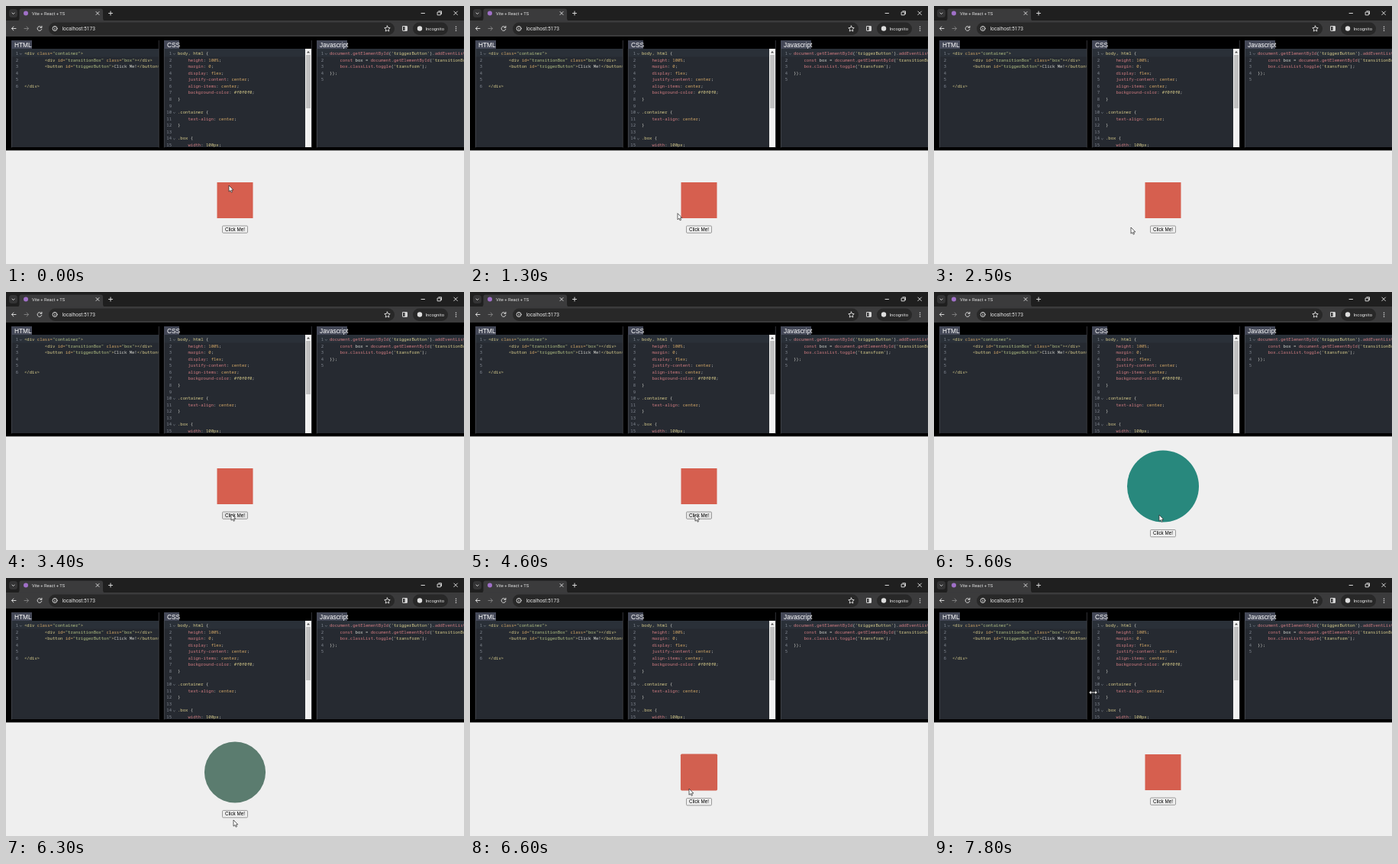
Write an HTML page that moves like this. It is 600x338 px and loops after 8 s.

```html
<!DOCTYPE html>
<html lang="en">
<head>
<meta charset="utf-8">
<title>Box transition playground</title>
<style>
  html, body { margin: 0; width: 100%; height: 100%; overflow: hidden; background: #efefef; }
  svg { display: block; width: 600px; height: 338px; }
  text { white-space: pre; }
  .code { font: 500 5.6px "Noto Sans Mono", "DejaVu Sans Mono", monospace; }
  .ui { font-family: Roboto, "Open Sans", sans-serif; fill: #e3e3e3; }
  .head { font: 8.3px "Liberation Sans", Arial, sans-serif; fill: #fff; }
  .line { fill: none; stroke: #d6d6d6; stroke-width: 1; stroke-linecap: round; stroke-linejoin: round; }
  .y { fill: #d9cd8c; } .o { fill: #d3a767; } .g { fill: #b3c184; }
  .r { fill: #d07c80; } .w { fill: #d2d2cc; } .n { fill: #858b95; }
</style>
</head>
<body>
<svg viewBox="0 0 600 338" xmlns="http://www.w3.org/2000/svg">
  <defs>
    <clipPath id="clip0"><rect x="7" y="56" width="193" height="129"/></clipPath>
    <clipPath id="clip1"><rect x="207" y="56" width="185" height="129"/></clipPath>
    <clipPath id="clip2"><rect x="407" y="56" width="193" height="129"/></clipPath>
  </defs>

  <!-- browser window -->
  <rect width="600" height="20" fill="#1f1f1f"/>
  <rect y="19" width="600" height="21" fill="#3b3b3c"/>
  <path d="M14 19.5Q17.500 19.500 17.500 16V6.500Q17.500 3.500 20.500 3.500H124Q127 3.500 127 6.500V16Q127 19.500 130.500 19.500Z" fill="#3b3b3c"/>
  <rect x="4" y="4" width="11" height="11" rx="3.500" fill="#343435"/>
  <circle cx="26" cy="9.500" r="3" fill="#a070c8"/>
  <text class="ui" x="34" y="11.800" font-size="5.700">Vite + React + TS</text>
  <rect x="56" y="21.500" width="453" height="16.500" rx="8.200" fill="#282828"/>
  <rect x="533" y="21.500" width="46" height="16.500" rx="8.200" fill="#282828"/>
  <circle cx="542" cy="29.500" r="3.200" fill="#dedede"/>
  <text class="ui" x="549.500" y="31.900" font-size="5.900">Incognito</text>
  <text class="ui" x="73.500" y="32.200" font-size="6.600">localhost:5173</text>
  <g class="line" stroke-width=".9">
    <path d="M8 9l1.600 1.600 1.600-1.600M118 7.500l4 4m0-4l-4 4M134.500 9.500h5m-2.500-2.500v5"/>
    <path d="M544 9.500h4.500M565.500 8h3.800v3.800h-3.800zM566.800 6.800h3.700v3.700M586.800 7l4.600 4.600m0-4.600l-4.600 4.600"/>
    <path d="M13 29.500H7.500m2.400-2.500l-2.500 2.500 2.500 2.500"/>
    <path d="M24 29.500h5.500m-2.400-2.500l2.500 2.500-2.500 2.500" stroke="#7d7d7d"/>
    <path d="M46.500 28a2.900 2.900 0 1 0 .3 2.400M46.900 26.300v2.100h-2.100"/>
    <circle cx="64" cy="29.500" r="3"/><path d="M64 29.300v1.500M64 27.800v.1"/>
    <path d="M499.500 26l1.100 2.400 2.600.3-1.900 1.800.5 2.600-2.300-1.300-2.300 1.300.5-2.600-1.900-1.800 2.600-.3z"/>
    <rect x="519.500" y="26.500" width="6" height="6" rx=".6"/>
  </g>
  <rect x="522.500" y="26.500" width="3" height="6" fill="#d6d6d6"/>
  <g fill="#d6d6d6"><circle cx="589.500" cy="27.200" r=".8"/><circle cx="589.500" cy="29.700" r=".8"/><circle cx="589.500" cy="32.200" r=".8"/></g>

  <!-- editors -->
  <rect y="40" width="600" height="149.500" fill="#000"/>
  <g id="panels"></g>
  <rect x="392" y="56" width="8" height="129" fill="#f1f1f1"/>
  <rect x="393" y="64" width="6" height="70" fill="#c1c1c1"/>
  <path d="M394 61.500l2-2.400 2 2.400z" fill="#505050"/>

  <!-- result -->
  <rect y="189.500" width="600" height="149" fill="#efefef"/>
  <rect id="box"/>
  <g id="button">
    <rect id="face" x="283.500" y="288" width="33" height="9.300" rx="1.200" stroke="#767676" stroke-width=".7"/>
    <text x="300" y="294.900" text-anchor="middle" font-family="'Liberation Sans', Arial, sans-serif" font-size="6.270">Click Me!</text>
  </g>
  <path id="arrow" d="M0 0V8.200L1.900 6.500 3.100 9.200 4.500 8.600 3.300 6H5.800Z" fill="#fff" stroke="#222" stroke-width=".7" stroke-linejoin="round"/>
  <path id="resize" d="M-5.500 0L-2.600-2.700V-.8H2.600V-2.700L5.500 0 2.600 2.700V.8H-2.600V2.700Z" fill="#fff" stroke="#000" stroke-width=".5"/>
</svg>
<script>
const $ = id => document.getElementById(id);
const esc = s => s.replace(/&/g, "&amp;").replace(/</g, "&lt;");

// Each line is a list of "<colour key>:<text>" parts joined by "|".
const decl = (name, value, key = "o") => `r:    ${name}|w:: |${key}:${value}|w:;`;
const panels = [
  { title: "HTML", x: 7, w: 27, num: 16, text: 24, folds: [0], lines: [
    'y:<div |o:class=|g:"container"|y:>',
    'y:        <div |o:id=|g:"transitionBox"|o: class=|g:"box"|y:></div>',
    'y:        <button |o:id=|g:"triggerButton"|y:>|w:Click Me!|y:</button>',
    '', '', 'y:</div>'] },
  { title: "CSS", x: 207, w: 20, num: 217, text: 225, folds: [0, 9, 13], lines: [
    'y:body, html |w:{', decl("height", "100%"), decl("margin", "0"), decl("display", "flex"),
    decl("justify-content", "center"), decl("align-items", "center"),
    decl("background-color", "#f0f0f0", "y"), 'w:}', '',
    'y:.container |w:{', decl("text-align", "center"), 'w:}', '',
    'y:.box |w:{', decl("width", "100px", "y")] },
  { title: "Javascript", x: 407, w: 40, num: 416, text: 424, folds: [0], lines: [
    "r:document|w:.|r:getElementById|w:(|y:'triggerButton'|w:).|r:addEventListener|w:(",
    "r:    const |w:box = |r:document|w:.|r:getElementById|w:(|y:'transitionBox'|w:);",
    "r:    box|w:.|r:classList|w:.|r:toggle|w:(|y:'transform'|w:);",
    'w:});', ''] }
];

const part = s => `<tspan class="${s[0]}">${esc(s.slice(2))}</tspan>`;
$("panels").innerHTML = panels.map((p, k) => {
  const rows = p.lines.map((line, i) => {
    const y = 64 + i * 8.57;
    const fold = p.folds.includes(i)
      ? `<path d="M${p.num + 2.2} ${y - 1.8}l1.200 1.200 1.200-1.200" fill="none" stroke="#858b95" stroke-width=".7"/>` : "";
    return `<text class="code n" x="${p.num}" y="${y}" text-anchor="end">${i + 1}</text>${fold}` +
      `<text class="code" x="${p.text}" y="${y}">${line ? line.split("|").map(part).join("") : ""}</text>`;
  }).join("");
  return `<rect x="${p.x}" y="45" width="${p.w}" height="11.500" fill="#444857"/>
    <text class="head" x="${p.x + 4}" y="53.800">${p.title}</text>
    <rect x="${p.x}" y="56" width="193" height="129" fill="#262a31"/>
    <g clip-path="url(#clip${k})"><rect x="${p.x}" y="56" width="193" height="10.500" fill="#2a3038"/>${rows}</g>
    <path d="M${p.x + .3} 56v129.500M${p.x + 193.3} 45v140.500" stroke="#55585e" stroke-width=".6"/>`;
}).join("");

const LOOP = 8000, STEP = 100, SIZE = 47;
const RED = [214, 95, 79], TEAL = [40, 136, 125];
const mix = (a, b, p) => a + (b - a) * p;

// CSS "ease": cubic-bezier(.25, .1, .25, 1)
function ease(x) {
  if (x <= 0) return 0;
  if (x >= 1) return 1;
  const curve = (a, b, u) => 3 * a * u * (1 - u) ** 2 + 3 * b * u * u * (1 - u) + u ** 3;
  let lo = 0, hi = 1;
  for (let i = 0; i < 24; i++) {
    const mid = (lo + hi) / 2;
    if (curve(.25, .25, mid) < x) lo = mid; else hi = mid;
  }
  return curve(.1, 1, lo);
}

// time, x, y of the pointer tip
const path = [
  [0, 292, 235], [1100, 292, 235], [1400, 262, 290], [2200, 262, 290], [2500, 258, 290],
  [2800, 295, 291], [4300, 295, 291], [4400, 295, 292], [5800, 295, 292], [6000, 298, 317],
  [6400, 298, 317], [6600, 287, 276], [6700, 284, 272], [6900, 284, 272], [7000, 282, 284],
  [7600, 282, 284], [7800, 208.5, 150], [LOOP, 208.5, 150]
];

function pointer(t) {
  const i = path.findIndex(k => k[0] > t);
  const [t0, x0, y0] = path[i - 1], [t1, x1, y1] = path[i];
  const p = (t - t0) / (t1 - t0);
  return [mix(x0, x1, p), mix(y0, y1, p)];
}

function draw(now) {
  const t = Math.floor((now % LOOP) / STEP) * STEP;
  const p = ease((t - 4825) / 500) - ease((t - 6200) / 500);
  const d = SIZE * (1 + p), shift = (d - SIZE) / 2;
  const [x, y] = pointer(t);

  const box = { x: 300 - d / 2, y: 231 - shift, width: d, height: d, rx: Math.min(d / 2, p * 70),
    fill: `rgb(${RED.map((c, i) => Math.round(mix(c, TEAL[i], p)))})` };
  for (const k in box) $("box").setAttribute(k, box[k]);

  $("button").setAttribute("transform", `translate(0 ${shift})`);
  const over = x > 283 && x < 317 && y > 287.5 + shift && y < 297.5 + shift;
  $("face").setAttribute("fill", over ? "#e5e5e5" : "#efefef");

  const resizing = t >= 7800;
  $("arrow").style.display = resizing ? "none" : "";
  $("resize").style.display = resizing ? "" : "none";
  $(resizing ? "resize" : "arrow").setAttribute("transform", `translate(${x} ${y})`);
}

const start = performance.now();
function tick() {
  draw(performance.now() - start);
  requestAnimationFrame(tick);
}
tick();
</script>
</body>
</html>
```
